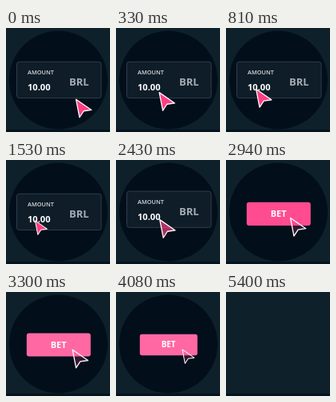
An HTML page with a canvas for the animation above (8 s loop, 130 by 130 pixels).

```html
<!DOCTYPE html>
<html lang="en">
<head>
<meta charset="utf-8">
<title>Place a bet</title>
<style>
html, body { margin: 0; width: 100%; height: 100%; overflow: hidden; background: #0e212b; }
canvas { display: block; width: 130px; height: 130px; }
</style>
</head>
<body>
<canvas id="stage"></canvas>
<script>
const LOOP = 8000, SCROLL = 88, SECOND_MOVE = 2265;
const canvas = document.getElementById('stage');
const ratio = window.devicePixelRatio || 1;
canvas.width = canvas.height = Math.round(130 * ratio);
const ctx = canvas.getContext('2d');

const span = (t, from, to) => Math.min(1, Math.max(0, (t - from) / (to - from)));
const easeOut = u => 1 - (1 - u) ** 3;
const easeInOut = u => u < 0.5 ? 4 * u ** 3 : 1 - 4 * (1 - u) ** 3;
const mix = (a, b, p) => a + (b - a) * p;
const press = (t, down, up) =>
  easeInOut(span(t, down, down + 420)) - easeInOut(span(t, up, up + 620));

function box(x, y, w, h, r, fill, line) {
  ctx.beginPath();
  ctx.roundRect(x, y, w, h, r);
  ctx.fillStyle = fill;
  ctx.fill();
  if (line) {
    ctx.strokeStyle = line;
    ctx.lineWidth = 1;
    ctx.stroke();
  }
}

function label(text, x, y, size, weight, color, align = 'left') {
  ctx.font = `${weight} ${size}px "Open Sans", sans-serif`;
  ctx.textAlign = align;
  ctx.fillStyle = color;
  ctx.fillText(text, x, y);
}

function drawField() {
  box(13.5, 42.3, 105.5, 45.2, 3, '#0f1d28', '#2e3d48');
  label('AMOUNT', 27, 58, 7.4, 600, '#d5dade');
  label('10.00', 27, 77.8, 11.1, 700, '#ffffff');
  label('BRL', 79, 71.7, 13, 700, '#a3adb5');
}

function drawButton(hover, pressed) {
  const scale = 1 - 0.1 * pressed;
  ctx.save();
  ctx.translate(65.8, 66 + SCROLL);
  ctx.scale(scale, scale);
  box(-40, -14.6, 80, 29.2, 3, `rgb(255,${mix(64, 104, hover)},${mix(136, 163, hover)})`);
  label('BET', -0.2, 3.8, 11, 700, '#ffffff', 'center');
  ctx.restore();
}

function drawCursor(x, y, scale, fill) {
  ctx.save();
  ctx.translate(x, y);
  ctx.scale(scale, scale);
  ctx.beginPath();
  ctx.moveTo(1.2, 1.2);
  ctx.lineTo(20.5, 14.5);
  ctx.lineTo(10.8, 15.8);
  ctx.lineTo(5.6, 23.8);
  ctx.closePath();
  ctx.fillStyle = `rgba(255,61,130,${fill})`;
  ctx.fill();
  ctx.strokeStyle = '#ffffff';
  ctx.lineWidth = 1.3;
  ctx.lineJoin = 'round';
  ctx.stroke();
  ctx.restore();
}

function draw(t) {
  const move1 = easeOut(span(t, 0, 1100));
  const move2 = easeOut(span(t, SECOND_MOVE, SECOND_MOVE + 1100));
  const scroll = SCROLL * easeInOut(span(t, SECOND_MOVE, SECOND_MOVE + 800));
  const click1 = press(t, 1080, 1620);
  const click2 = press(t, 3480, 4080);

  ctx.setTransform(ratio, 0, 0, ratio, 0, 0);
  ctx.globalAlpha = 1;
  ctx.fillStyle = '#0e212b';
  ctx.fillRect(0, 0, 130, 130);
  ctx.fillStyle = '#05131e';
  ctx.fillRect(0, 127, 130, 3);

  ctx.globalAlpha = 1 - span(t, 5100, 5400);
  if (!ctx.globalAlpha) return;
  ctx.save();
  ctx.beginPath();
  ctx.arc(65.5, 65, 61.5, 0, 7);
  ctx.fillStyle = '#020f1b';
  ctx.fill();
  ctx.clip();
  ctx.translate(0, -scroll);
  drawField();
  drawButton(span(t, 2850, 3150), click2);
  ctx.restore();

  // The pointer turns almost hollow as it heads for the pink button.
  drawCursor(
    mix(mix(86.5, 35.5, move1), 82, move2),
    mix(mix(88, 75, move1), 71, move2),
    1 - 0.23 * (click1 + click2),
    mix(1, 0.2, span(t, SECOND_MOVE, SECOND_MOVE + 400))
  );
}

const start = performance.now();
function frame() {
  draw((performance.now() - start) % LOOP);
  requestAnimationFrame(frame);
}
frame();
</script>
</body>
</html>
```
